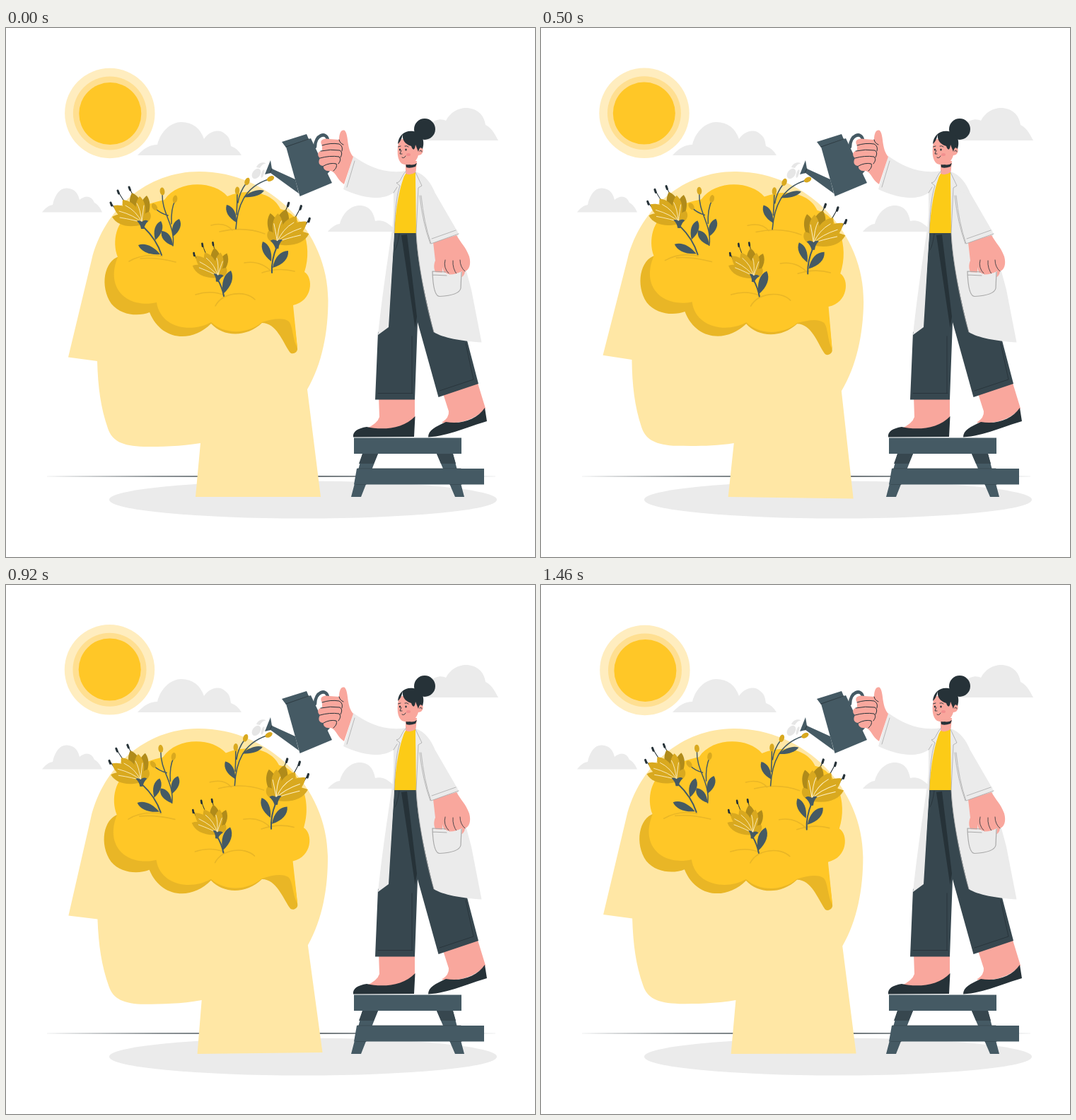
An HTML page with a canvas that plays this animation: 748 by 748 pixels, repeating every 1.5 s.

```html
<!DOCTYPE html>
<html lang="en">
<head>
<meta charset="utf-8">
<title>Growing mind</title>
<style>
html, body { margin: 0; width: 100%; height: 100%; overflow: hidden; background: #fff; }
canvas { display: block; width: 748px; height: 748px; }
</style>
</head>
<body>
<canvas id="stage" width="748" height="748"></canvas>
<script>
const ctx = document.getElementById('stage').getContext('2d');
const LOOP = 1500;
const TAU = Math.PI * 2;
const C = {
  gold: '#ffc727', shade: '#e9b626', pale: '#ffe7a5', petal: '#d9a91f', deep: '#b08b1a',
  cloud: '#ebebeb', ink: '#263238', navy: '#37474f', slate: '#455a64', skin: '#f9a79d', seam: '#a9a9a9'
};

function fill(color, path) {
  ctx.fillStyle = color;
  ctx.fill(new Path2D(path));
}

function line(color, width, path) {
  ctx.strokeStyle = color;
  ctx.lineWidth = width;
  ctx.stroke(new Path2D(path));
}

function oval(color, x, y, rx, ry = rx, turn = 0) {
  ctx.fillStyle = color;
  ctx.beginPath();
  ctx.ellipse(x, y, rx, ry, turn, 0, TAU);
  ctx.fill();
}

// Pointed blade between two points; `bulge` is the half width of its control hull.
function blade(color, x0, y0, x1, y1, bulge) {
  const dx = x1 - x0, dy = y1 - y0, len = Math.hypot(dx, dy);
  const nx = -dy / len * bulge, ny = dx / len * bulge;
  const ax = x0 + dx * 0.4, ay = y0 + dy * 0.4, bx = x0 + dx * 0.78, by = y0 + dy * 0.78;
  fill(color, `M${x0},${y0} C${ax + nx},${ay + ny} ${bx + nx},${by + ny} ${x1},${y1}
    C${bx - nx},${by - ny} ${ax - nx},${ay - ny} ${x0},${y0}Z`);
}

function drawSun(phase) {
  const dx = Math.cos(phase + 0.84), dy = Math.sin(phase + 0.84);
  oval('#ffedbf', 146.5 + dx * 0.5, 120.2 + dy * 0.4, 63.7);
  oval('#ffdf91', 146.5 + dx * 0.6, 120.2 + dy * 0.5, 52);
  oval(C.gold, 146.7 + dx * 0.9, 120.4 + dy * 0.9, 44);
}

function drawBackdrop() {
  fill(C.cloud, 'M186,180 C195,170 204,165 214,165 C219,145 234,133 248,133 C264,133 275,142 280,157 C288,145 302,142 310,150 C317,155 317,162 318,167 C326,170 330,175 333,180Z');
  fill(C.cloud, 'M51,260.500 C57,253 61,251 66,250 C69,235 77,226 86,226.500 C97,227 102,234 104,243 C112,236 121,237 125,247 C131,250 134,256 136,260.500Z');
  fill(C.cloud, 'M584,159 C592,148 598,135 605,132 C612,128 617,129 622,131 C628,119 640,113 650,113 C665,113 676,122 678,137 C688,142 692,152 696,159Z');
  fill(C.cloud, 'M455,288 C461,281 467,277 472,277 C476,261 488,251 500,251 C514,251 520,261 522,273 C532,270 543,276 552,288Z');
  fill(C.ink, 'M50,634 Q375,632.600 700,634 Q375,635.600 50,634Z');
  oval(C.cloud, 420, 667, 274, 26.5);
  fill('#e6e6e6', 'M354,197 C356,191 364,188 368,192 C364,191 361,195 359,198Z');
  oval('#e6e6e6', 354, 206, 5.5, 8, 0.6);
  oval('#e6e6e6', 363, 206, 1.8, 6, 0.3);
}

function drawBrain() {
  fill(C.shade, `M160,323 C139,329 132,365 149,390 C163,407 188,408 203,402
    C219,442 262,446 290,418 C307,437 340,438 362,417 C382,417 391,443 401,458
    C404,463 413,459 412,453 L405,392 L300,300Z`);
  fill(C.gold, `M158,324 C149,301 157,272 176,263 C191,251 210,246 224,243
    C243,215 293,215 313,238 C342,226 377,232 388,256 C417,262 435,306 422,345
    C435,353 434,386 406,392 L412,452 C405,440 406,422 400,415 C392,409 378,411 362,416
    C342,433 309,434 290,416 C262,432 218,424 213,388 C175,397 139,371 158,324Z`);
  [
    'M174,330 Q194,318 221,323', 'M190,326 Q212,324 240,331',
    'M290,279 Q310,274 320,286', 'M302,288 Q337,280 366,291',
    'M268,377 Q290,370 309,378', 'M296,393 C306,374 338,370 352,384',
    'M337,332 Q360,328 376,345', 'M362,346 Q386,338 408,344', 'M277,330 Q284,325 290,329'
  ].forEach(p => line(C.shade, 1.6, p));
}

function drawFlower(x, y, size, turn, mirror = 1) {
  ctx.save();
  ctx.translate(x, y);
  ctx.scale(size * mirror, size);
  ctx.rotate(turn);
  [[-40, -31, -45, -35], [-28, -42, -35, -52], [-13, -46, -19, -57]].forEach(([a, b, tx, ty]) => {
    line(C.ink, 1, `M${a + 8},${b + 12} Q${a + 1},${b + 5} ${tx},${ty}`);
    line(C.ink, 3, `M${tx},${ty} l1.500,4`);
  });
  blade(C.deep, 0, -5, -15, -49, 11);
  blade(C.deep, 0, -5, 6, -45, 9);
  blade(C.petal, 0, -4, -43, -15, 10);
  blade(C.petal, 0, -4, -41, -31, 11);
  blade(C.petal, 0, -4, -28, -39, 11);
  blade(C.petal, -1, -4, -4, -44, 9);
  blade(C.petal, 1, -4, 10, -22, 7);
  [[-32, -14], [-33, -23], [-24, -31], [-8, -34], [2, -31]].forEach(([tx, ty]) =>
    line('#fff0c4', 0.9, `M-1,-7 Q${tx * 0.35},${ty * 0.75} ${tx},${ty}`));
  fill(C.slate, 'M-8,-9 Q-4,-11 -1,-8 Q4,-12 8,-9 Q3,-4 2,2 L-2,2 Q-3,-5 -8,-9Z');
  ctx.restore();
}

function drawPlants() {
  const stem = p => line(C.slate, 2, p);
  stem('M220,321 Q213,299 194,281');
  blade(C.slate, 211, 300, 219, 273, 7);
  blade(C.slate, 218, 320, 187, 307, 7);
  drawFlower(193, 282, 1, 0);

  line(C.slate, 1.5, 'M236,308 C240,280 220,262 221,235 M229,265 Q218,262 211,255 M234,277 Q233,256 239,244');
  blade(C.slate, 236, 308, 220, 287, 7);
  blade(C.slate, 236, 295, 245, 270, 7);
  oval(C.petal, 221, 231, 3.4, 5.5, -0.1);
  oval(C.petal, 210, 253, 3.4, 5.5, -0.6);
  oval(C.petal, 239, 242, 3.2, 5.5, 0.2);

  stem('M376,346 Q375,328 383,309');
  blade(C.slate, 375, 330, 363, 302, 7);
  blade(C.slate, 377, 339, 399, 315, 8);
  drawFlower(383, 310, 1.08, 0.06, -1);

  stem('M308,379 Q306,367 299,355');
  blade(C.slate, 307, 376, 318, 343, 8);
  drawFlower(299, 357, 0.9, 0.2);

  line(C.slate, 1.6, 'M325,284 C327,252 337,225 371,214 M326,264 Q327,247 327,232 M328,247 Q330,232 340,219');
  blade(C.slate, 326, 275, 312, 250, 7);
  blade(C.slate, 336, 239, 365, 230, 5);
  oval(C.petal, 341, 217, 3.4, 5.5, 0.35);
  oval(C.petal, 327, 230, 3.2, 5.5, 0.05);
  oval(C.petal, 374, 213, 3.4, 5.5, 1.1);
}

function drawHead(phase) {
  ctx.save();
  ctx.translate(272, 432);
  ctx.rotate(0.0167 * Math.sin(phase));
  ctx.translate(-272, -432);
  fill(C.pale, `M88,465.500 L121,328 C139,255 200,203 273,203 C374,203 455.500,288 455.500,385
    C455.500,430 447,475 426,511 L445,663 L268,663 L275,587 C246,592 217,592 195,592
    C164,591 150,584 144,566 C134,537 130,508 129,471Z`);
  drawBrain();
  drawPlants();
  ctx.restore();
}

function drawStool() {
  fill(C.slate, 'M504,602 H526 L502,663 H488Z M609,602 H632 L648,663 H635Z');
  fill(C.navy, 'M504,602 H526 L520,616 H499Z M609,602 H632 L636,616 H615Z');
  fill(C.slate, 'M496,623 H676 V645.500 H492Z');
  fill(C.slate, 'M492,579.500 H644 V602 H492Z');
  line(C.navy, 0.7, 'M497,623 H643 M495,645.500 H509 M628,645.500 H644');
}

function drawLegs() {
  fill(C.skin, 'M527,520 H578 V552 Q560,571 508,567 Q525,560 528,550Z');
  fill(C.ink, 'M491,578.500 C490,570 498,566 510,564 C532,569 562,567 578.500,549 L577,578Z');
  fill(C.skin, 'M618,517 L667,502 L678,538 Q655,562 616,558 Q627,551 626,542Z');
  fill(C.ink, 'M597,578.500 C597,569 607,564 622,557 C645,561 666,553 677,537 L680,556 C655,563 626,577 597,578.500Z');
  fill(C.navy, 'M549,289 H581 L607,425 L652,442 L668,503 L611.500,522 L582,416 L578,525.500 H522 L526,430 L540,422Z');
  fill(C.ink, 'M559,293 L567,292 L581,408 L578.500,424Z');
  line(C.ink, 0.8, 'M526,516.500 H575 M574,436 V516 M613,513 L661,497 L650,446 M556,291 Q554,307 550,314');
}

function drawTorso() {
  fill(C.skin, 'M565,188 H581 L579,209 L565,211Z');
  fill(C.ink, 'M565,191 Q574,196 581,191 L579,196 Q571,199 566,197Z');
  fill('#fccb17', 'M565,206 Q572,209 579,204 L582,290 H547 C550,260 552,224 565,206Z');
  fill(C.cloud, `M491,181 C512,196 536,207 566,202 C556,224 551,255 549,291 L541,423 L526,434
    C531,385 539,332 545,291 C549,268 548,252 548,233 C529,246 500,239 477,228Z`);
  fill(C.cloud, `M579,203 C593,207 602,221 607,234 L640,291 L638,296 L658,370 L672.500,444.500
    C645,443 617,438 605,430 C595,390 581,330 580,290Z`);
  line(C.seam, 0.8, 'M566,202 C558,210 559,218 552,219 L557,223 C551,240 550,268 549,290');
  line(C.seam, 0.8, 'M579,204 L588,223 L583,226 L580,290 C583,340 596,400 605,430');
  line(C.seam, 0.8, 'M493,188 L482,225 M548,233 L553,225 M585,237 Q589,275 600,305 M602,298 L637,287');
}

function drawLowHand() {
  fill(C.skin, `M604,303 L637,293 C643,304 650,309 655,323 C658,334 655,342 649,344
    C648,353 641,355 638,349 C635,356 627,354 626,347 C619,351 616,340 618,329
    L617,345 C609,355 602,340 607,329Z`);
  line(C.ink, 0.8, 'M621,328 Q618,339 626,347 M632,329 Q631,340 638,349 M642,328 Q642,338 649,344');
  fill(C.cloud, 'M586,230 L607,234 L640,291 L601,305Z');
  line(C.seam, 0.8, 'M587,237 Q591,276 601,305 L640,291 M602,298 L636,286');
  fill(C.cloud, 'M603,345 L622,346 Q627,352 645,344 L643,367 Q640,379 613,379.500 Q605,379 603,345Z');
  line(C.seam, 1.2, 'M603,344 Q604,379 613,379.500 Q641,378 643,368 L644,345 M603,344 L622,345 M603,349 L623,350');
}

function drawFace() {
  oval(C.ink, 592, 143, 15);
  fill(C.skin, 'M556,158 C552,174 553,187 560,192 C570,196 580,191 583,180 C591,180 592,168 585,168 L580,153Z');
  fill(C.ink, 'M554,164 C555,151 565,144 576,146 C588,148 593,159 589,171 Q585,166 583,175 L579,165 C578,174 575,173 573,167 C563,164 560,157 561,150 Q559,160 554,164Z');
  oval(C.ink, 557, 172, 1.2, 1.6);
  oval(C.ink, 565.5, 172, 1.2, 1.6);
  line(C.ink, 0.9, 'M554.500,168 L558,167 M564,167 Q567,166 569,168 M559,173 L557,178 L560,178 M560,183 Q563,185 565,181 M585,174 Q588,172 588,175');
  oval('#f28f8f', 569, 179, 3, 2);
}

function drawCan() {
  line(C.slate, 4.5, 'M437,168 C437,151 453,146 455,158 M460,186 C460,199 454,207 444,207');
  fill(C.slate, 'M396,168 L431,156 L461,219 L415.500,238Z');
  fill(C.slate, 'M390,161 L425,150 L428,157 L396,169Z');
  line(C.ink, 0.8, 'M396,168 L428,157');
  fill(C.slate, 'M374,187 L376,199 L409,214 L414,234 L374,205 L366,207Z');
  line(C.ink, 0.8, 'M376,199 L373,205');
}

function drawRaisedHand() {
  fill(C.skin, `M447,166 C442,159 449,155 457,157 L471,158 C471,147 475,143 479,145
    C485,152 481,170 491,182 L478,221 C466,212 468,205 459,202 C453,203 448,200 449,195
    C442,195 441,189 444,184 C439,180 441,173 447,174Z`);
  line(C.ink, 1, 'M447,166 Q459,162 471,164 Q477,167 475,174 M445,174 Q459,171 472,173 Q477,176 473,183 M444,184 Q458,180 471,182 Q475,186 470,192 M449,195 Q458,190 467,192 Q469,197 463,202 M471,158 Q472,163 477,165');
}

function render(now) {
  const phase = (now % LOOP) / LOOP * TAU;
  ctx.fillStyle = '#fff';
  ctx.fillRect(0, 0, 748, 748);
  ctx.lineCap = ctx.lineJoin = 'round';
  drawBackdrop();
  drawSun(phase);
  drawHead(phase);
  drawStool();
  drawLegs();
  drawTorso();
  drawLowHand();
  drawFace();
  drawCan();
  drawRaisedHand();
}

const start = performance.now();
function tick() {
  render(performance.now() - start);
  requestAnimationFrame(tick);
}
tick();
</script>
</body>
</html>
```
